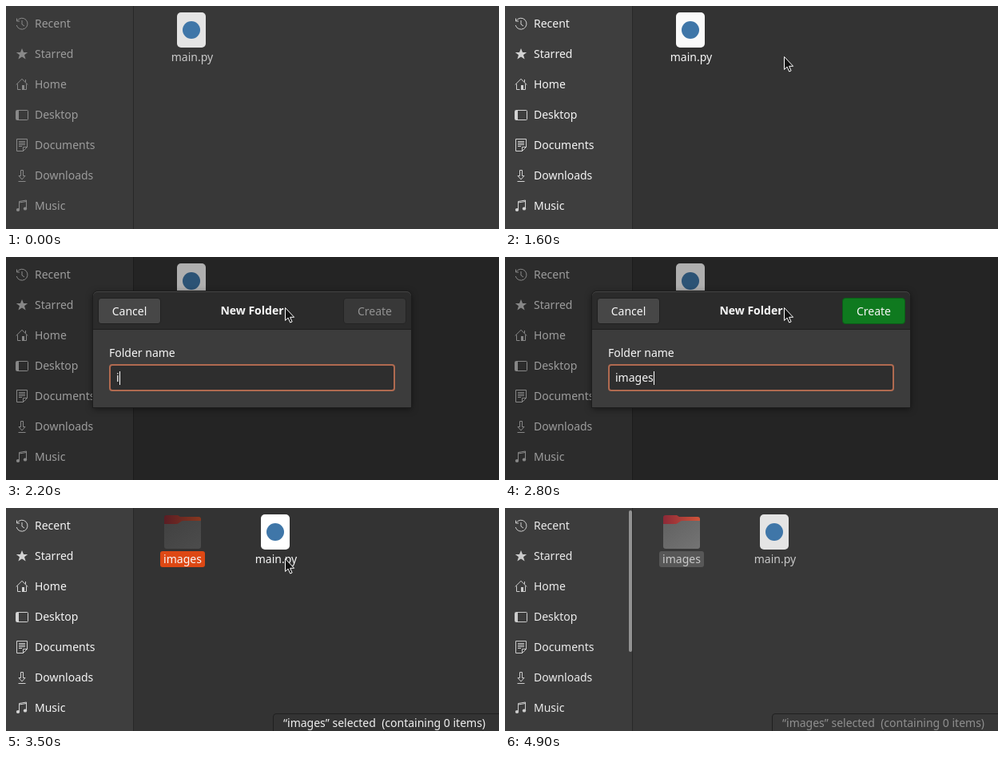
These frames come from a looping animation (617x279 px, 5000 ms). An HTML page:

```html
<!DOCTYPE html>
<html lang="en">
<head>
<meta charset="utf-8">
<title>Creating a folder</title>
<style>
html, body { margin: 0; width: 100%; height: 100%; overflow: hidden; background: #383838; }
.stage {
  position: relative; width: 617px; height: 279px; overflow: hidden;
  font: 14px/20px "Noto Sans", "Open Sans", sans-serif; white-space: nowrap;
  color: var(--label); background: var(--main);
}
.stage * { box-sizing: border-box; }
.stage div, .stage > svg, ul { position: absolute; }

/* Every part shares one 5 s clock; 2% is one 100 ms tick. */
.stage, .file, .folder, .menu, .hover, .shade, .dialog, .create, .typed::before, .status, .scroll, .cursor {
  animation: 5s step-end infinite;
}

.stage { animation-name: theme; }
@keyframes theme {
  0% { --main: #383838; --side: #3a3a3a; --text: #9b9b9b; --label: #c9c9c9; --paper: #e4e4e4; --note: #8f8f8f;
       --select: #505050; --back1: #5a1d24; --back2: #87381f; --front1: #414141; --front2: #4c4c4c; }
  18% { --main: #333; --side: #3e3e3e; --text: #e0e0e0; --label: #f0f0f0; --paper: #f8f8f8; }
  20% { --main: #333; --side: #3e3e3e; --text: #f4f4f4; --label: #f7f7f7; --paper: #fafafa; }
  42% { --main: #343434; --side: #3f3f3f; --text: #dedede; --label: #f0f0f0; --paper: #fafafa; }
  64% { --main: #343434; --side: #3f3f3f; --text: #f0f0f0; --label: #f0f0f0; --paper: #fafafa; }
  68% { --main: #333; --side: #3e3e3e; --text: #f4f4f4; --label: #f7f7f7; --paper: #fff; --note: #f0f0f0;
        --select: #dd4814; --back1: #5a1d24; --back2: #87381f; --front1: #414141; --front2: #4c4c4c; }
  96% { --main: #353535; --side: #3d3d3d; --text: #f0f0f0; --label: #e4e4e4; --paper: #f2f2f2; --note: #c0c0c0;
        --select: #8a4c35; --back1: #73242f; --back2: #aa462c; --front1: #535353; --front2: #626262; }
  98%, 100% { --main: #383838; --side: #3c3c3c; --text: #ebebeb; --label: #c9c9c9; --paper: #e4e4e4; --note: #8f8f8f;
        --select: #575757; --back1: #8c2937; --back2: #d2553a; --front1: #616161; --front2: #747474; }
}

.side { left: 0; top: 0; width: 160px; height: 279px; background: var(--side); border-right: 1px solid #282828; }
ul { left: 0; top: 3px; margin: 0; padding: 0; list-style: none; color: var(--text); }
li { position: relative; height: 38px; padding-left: 36px; line-height: 38px; }
li svg { position: absolute; left: 12px; top: 11px; fill: none; stroke: currentColor; opacity: .82; }
li .solid { fill: currentColor; stroke: none; }
.scroll { left: 155px; top: 3px; width: 4px; height: 177px; border-radius: 2px; background: #929292; opacity: 0; animation-name: scroll; }
@keyframes scroll {
  0% { opacity: 0; }
  80% { opacity: .4; }
  82% { opacity: .8; }
  84% { opacity: .95; }
  88%, 100% { opacity: 1; }
}

.file { left: 193px; top: 8px; width: 80px; height: 70px; animation-name: shift; }
@keyframes shift { 0% { transform: none; } 68%, 100% { transform: translateX(105px); } }
.paper { left: 21px; top: 0; width: 36px; height: 44px; border-radius: 5px; background: var(--paper); }
.dot { left: 7px; top: 11px; width: 22px; height: 22px; border-radius: 50%; background: #3f76a8; }
.name { left: 0; top: 46px; width: 80px; text-align: center; }
.folder { left: 193px; top: 8px; width: 56px; height: 70px; animation-name: late; }
.folder svg { position: absolute; left: 5px; top: 1px; }
.folder .name { width: 56px; height: 20px; border-radius: 3px; background: var(--select); }
.status {
  left: 334px; top: 257px; width: 290px; height: 30px; padding: 1px 0 0 12px; border: 1px solid #202020;
  border-radius: 4px 0 0; background: var(--main); color: var(--note); white-space: pre; animation-name: late;
}
@keyframes late { 0% { opacity: 0; } 68% { opacity: .8; } 70%, 100% { opacity: 1; } }

.menu {
  left: 341px; top: 49px; width: 263px; height: 139px; padding-top: 4px; border: 1px solid #202020;
  border-radius: 5px; background: #3f3f3f; box-shadow: 0 2px 4px #0005; color: #f4f4f4; animation-name: menu;
}
@keyframes menu { 0% { opacity: 0; } 18% { opacity: 1; } 30% { opacity: .5; } 32%, 100% { opacity: 0; } }
.menu p { position: relative; margin: 0; height: 26px; padding: 0 9px 0 31px; line-height: 26px; border-bottom: 1px solid #383838; }
.menu p:last-child { border: 0; }
.menu span { float: right; color: #999; }
.menu .off { color: #8b8b8b; }
.hover { left: 0; top: 4px; width: 261px; height: 25px; background: #4f4f4f; animation-name: hover; }
@keyframes hover { 0% { opacity: 0; } 26%, 100% { opacity: 1; } }

.shade { inset: 0; background: #000; animation-name: shade; }
@keyframes shade {
  0% { opacity: 0; }
  34% { opacity: .08; }
  36% { opacity: .18; }
  38% { opacity: .26; }
  40% { opacity: .3; }
  64% { opacity: .27; }
  66% { opacity: .1; }
  68%, 100% { opacity: 0; }
}
.dialog {
  left: 109px; top: 43px; width: 398px; height: 145px; border-radius: 6px 6px 0 0; background: #3c3c3c;
  box-shadow: 0 0 0 1px #1d1d1d, 0 2px 8px #0008; color: #f7f7f7; transform-origin: 50% 75px; animation-name: dialog;
}
@keyframes dialog {
  0% { opacity: 0; transform: scaleY(.1); }
  34% { opacity: .8; transform: scaleY(.3); }
  36% { opacity: 1; transform: scaleY(.75); }
  38% { opacity: 1; transform: none; }
  64% { opacity: 1; transform: scaleY(.53); }
  66%, 100% { opacity: 0; transform: scaleY(.1); }
}
.header {
  left: 0; top: 0; width: 398px; height: 48px; border-radius: 6px 6px 0 0; border-top: 1px solid #444; border-bottom: 1px solid #1f1f1f;
  background: #2b2b2b; font-weight: bold; line-height: 46px; text-align: center;
}
.button { left: 6px; top: 7px; width: 79px; height: 33px; border: 1px solid #202020; border-radius: 4px; background: #474747; font-weight: normal; line-height: 31px; }
.create { left: 313px; animation-name: create; }
@keyframes create {
  0% { background: #383838; color: #929292; border-color: #242424; }
  46% { background: #24592b; color: #c4c4c4; border-color: #174a1d; }
  48%, 100% { background: #0f7a1f; color: #f7f7f7; border-color: #0b5c17; }
}
.caption { left: 20px; top: 67px; }
.typed { left: 20px; top: 91px; width: 358px; height: 34px; padding-left: 7px; border: 2px solid #b06a50; border-radius: 4px; background: #2e2e2e; line-height: 30px; }
.typed::before { content: ""; animation-name: type; }
.typed::after { content: ""; display: inline-block; width: 1px; height: 17px; background: #fff; vertical-align: -4px; }
@keyframes type {
  0% { content: ""; }
  44% { content: "i"; }
  48% { content: "im"; }
  50% { content: "ima"; }
  52% { content: "imag"; }
  54% { content: "image"; }
  56%, 100% { content: "images"; }
}

.cursor { left: 0; top: 0; overflow: visible; animation-name: cursor; }
@keyframes cursor {
  0% { opacity: 0; transform: translate(335px, 17px); }
  8% { opacity: 1; transform: translate(335px, 17px); }
  10% { opacity: 1; transform: translate(340px, 48px); }
  24% { opacity: 1; transform: translate(344px, 54px); }
  26% { opacity: 1; transform: translate(347px, 60px); }
  30% { opacity: 1; transform: translate(349px, 63px); }
  76% { opacity: 1; transform: translate(262px, 77px); }
  78% { opacity: 1; transform: translate(130px, 95px); }
  80% { opacity: 1; transform: translate(18px, 108px); }
  82%, 100% { opacity: 0; transform: translate(18px, 108px); }
}
</style>
</head>
<body>
<div class="stage">
  <div class="side">
    <ul>
      <li><svg width="16" height="16"><path d="M2 4.5A7 7 0 1 1 1.2 10M1.5 1.5V5H5M8 4v5l3 2"/></svg>Recent</li>
      <li><svg width="16" height="16"><path class="solid" d="M8 1l2 5h5.2l-4.2 3.3 1.6 5.2L8 11.4l-4.6 3.1L5 9.3.8 6H6z"/></svg>Starred</li>
      <li><svg width="16" height="16"><path d="M.7 8.5 8 1.3l7.3 7.2M2.5 7.5v7h4M13.5 7.5v7h-3M12.5 5V2"/><path class="solid" d="M8 9h3v6H8z"/></svg>Home</li>
      <li><svg width="16" height="16"><rect x=".5" y="2.5" width="15" height="12" rx="1"/><path class="solid" d="M1 3h3v11H1z"/></svg>Desktop</li>
      <li><svg width="16" height="16"><path d="M1.5.5h13v10l-5 5h-8zM14.5 10.5h-5v5M4 3.5h8M4 5.5h8M4 7.5h8M4 9.5h4"/></svg>Documents</li>
      <li><svg width="16" height="16"><path d="M6.5 1.5h3v7H12l-4 4.5-4-4.5h2.5zM3.5 15.5h9"/></svg>Downloads</li>
      <li><svg width="16" height="16"><path d="M4.5 13V2.5l9-1.5v10.5M4.5 4l9-1.5"/><g class="solid"><ellipse cx="3" cy="13" rx="2.2" ry="2"/><ellipse cx="12" cy="11.5" rx="2.2" ry="2"/></g></svg>Music</li>
    </ul>
    <div class="scroll"></div>
  </div>

  <div class="folder">
    <svg width="46" height="42">
      <defs>
        <linearGradient id="back"><stop stop-color="var(--back1)"/><stop offset="1" stop-color="var(--back2)"/></linearGradient>
        <linearGradient id="front" x2="1" y2="1"><stop stop-color="var(--front1)"/><stop offset="1" stop-color="var(--front2)"/></linearGradient>
      </defs>
      <path fill="url(#back)" d="M0 3q0-3 3-3h14l3 2h23q3 0 3 3v18H0z"/>
      <path fill="url(#front)" d="M0 11h15q2 0 3-1l3-2q1-1 3-1h22v32q0 3-3 3H3q-3 0-3-3z"/>
    </svg>
    <div class="name">images</div>
  </div>
  <div class="file">
    <div class="paper"><div class="dot"></div></div>
    <div class="name">main.py</div>
  </div>
  <div class="status">“images” selected  (containing 0 items)</div>

  <div class="menu">
    <div class="hover"></div>
    <p>New Folder<span>Shift+Ctrl+N</span></p>
    <p class="off">Paste</p>
    <p>Select All<span>Ctrl+A</span></p>
    <p>Properties</p>
    <p>Open in Terminal</p>
  </div>

  <div class="shade"></div>
  <div class="dialog">
    <div class="header">New Folder<div class="button">Cancel</div><div class="button create">Create</div></div>
    <div class="caption">Folder name</div>
    <div class="typed"></div>
  </div>

  <svg class="cursor" width="14" height="20"><path d="M.5.5v16l3.6-3.4 2.6 5.9 2.4-1-2.5-5.7h5z" fill="#111" stroke="#fff"/></svg>
</div>
</body>
</html>
```
